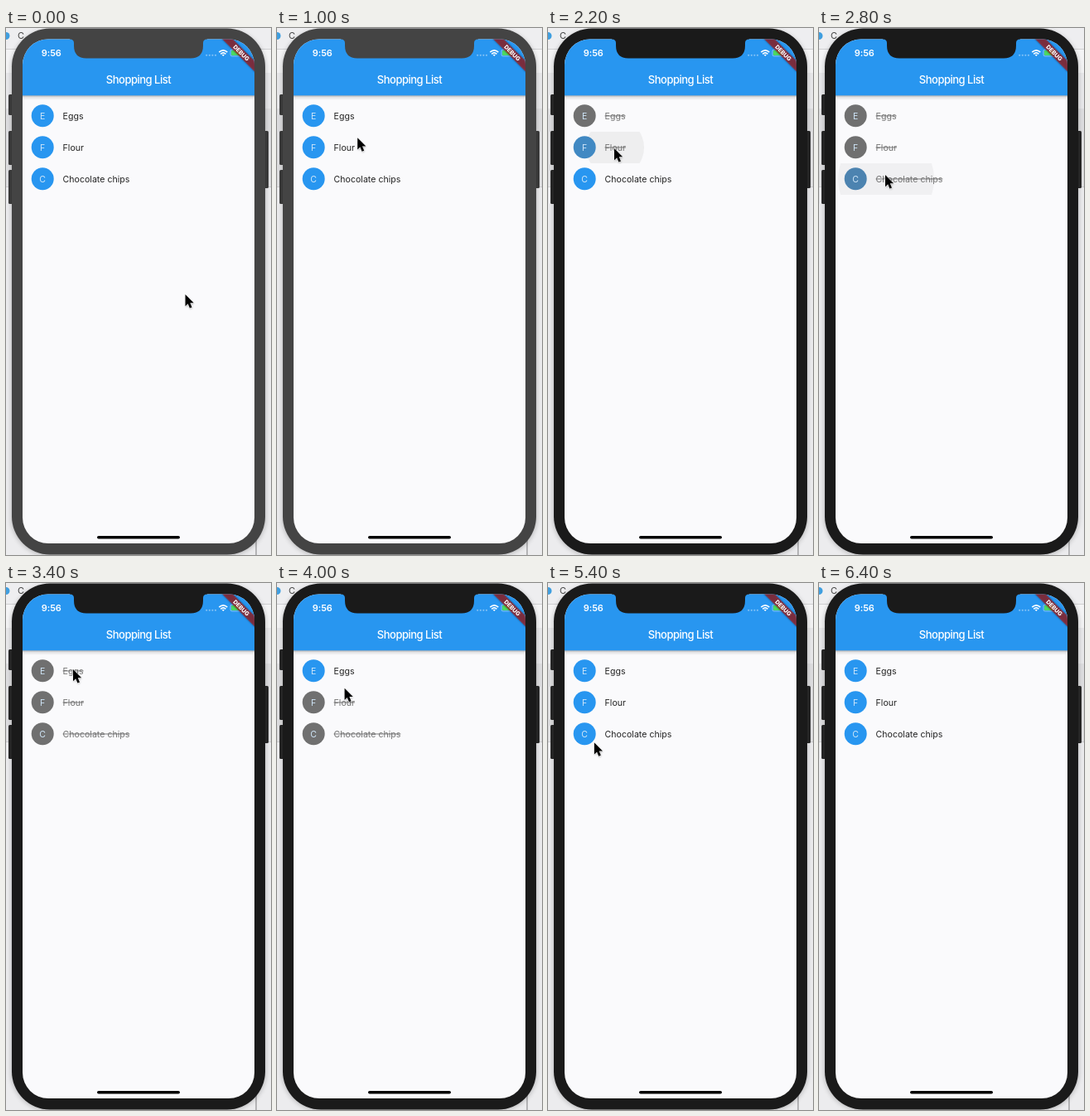
These frames come from a looping animation (320x635 px, 6.6 s). An HTML page:

```html
<!DOCTYPE html>
<html lang="en">
<head>
<meta charset="utf-8">
<title>Shopping List</title>
<style>
  html, body { margin: 0; width: 100%; height: 100%; overflow: hidden; background: #ececee; }
  svg { display: block; width: 100%; height: 100%; }
  text { font-family: Inter, "Open Sans", sans-serif; }
  .mid { text-anchor: middle; }
</style>
</head>
<body>
<svg viewBox="0 0 320 635" xmlns="http://www.w3.org/2000/svg">
  <defs>
    <clipPath id="screen"><rect x="20" y="13.5" width="280" height="607.5" rx="31"/></clipPath>
    <linearGradient id="barShade" x1="0" y1="0" x2="0" y2="1">
      <stop offset="0" stop-color="#000" stop-opacity=".32"/>
      <stop offset=".4" stop-color="#000" stop-opacity=".1"/>
      <stop offset="1" stop-color="#000" stop-opacity="0"/>
    </linearGradient>
    <filter id="soft" x="-20%" y="-20%" width="140%" height="140%"><feGaussianBlur stdDeviation="3"/></filter>
    <filter id="blur1" x="-40%" y="-40%" width="180%" height="180%"><feGaussianBlur stdDeviation="1"/></filter>
  </defs>

  <!-- desktop behind the phone -->
  <rect width="320" height="635" fill="#ececee"/>
  <rect width="320" height="25" fill="#eeeef0"/>
  <rect y="25" width="320" height="1" fill="#cfcfd1"/>
  <rect y="26" width="320" height="28" fill="#f4f4f5"/>
  <rect y="54" width="320" height="43" fill="#e9e9eb"/>
  <rect y="97" width="320" height="94" fill="#dedee0"/>
  <rect y="191" width="320" height="1" fill="#cacacc"/>
  <rect x="301" y="590" width="2" height="45" fill="#b4b4b6"/>
  <circle cx="0" cy="9.5" r="4.5" fill="#3f9fe0"/>
  <text x="14" y="13" font-size="11" fill="#444">C</text>
  <rect x="7" y="3" width="306" height="632" rx="46" fill="#000" opacity=".28" filter="url(#soft)"/>

  <!-- phone -->
  <g id="buttons">
    <rect x="3" y="80" width="6" height="25" rx="1.5"/>
    <rect x="3" y="124" width="6" height="41" rx="1.5"/>
    <rect x="3" y="171" width="6" height="41" rx="1.5"/>
    <rect x="311" y="124" width="6" height="69" rx="1.5"/>
  </g>
  <rect class="bezel" x="7" y="0.5" width="306" height="634" rx="46"/>

  <g clip-path="url(#screen)">
    <rect x="20" y="13" width="280" height="609" fill="#fafafc"/>
    <g id="list"></g>
    <rect x="20" y="81" width="280" height="6" fill="url(#barShade)"/>
    <rect x="20" y="13" width="280" height="68.3" fill="#2896f0"/>
    <text class="mid" x="160" y="67" font-size="13" font-weight="500" letter-spacing="-.5" fill="#fff">Shopping List</text>
    <text x="42.8" y="34.3" font-size="11" font-weight="600" letter-spacing="-.1" fill="#fff">9:56</text>
    <g fill="#fff" opacity=".4">
      <circle cx="242.2" cy="32.8" r="1.1"/><circle cx="245.8" cy="32.8" r="1.1"/>
      <circle cx="249.4" cy="32.8" r="1.1"/><circle cx="253" cy="32.8" r="1.1"/>
    </g>
    <g fill="none" stroke="#fff" stroke-width="1.6">
      <path d="M257.3 29.2q5-4.6 10 0M259.2 31.3q3.1-2.8 6.2 0"/>
      <path d="M260.7 32.3L262.3 34L263.9 32.3Q262.3 31 260.7 32.3z" fill="#fff" stroke="none"/>
    </g>
    <rect x="271" y="26" width="15.5" height="8" rx="2" fill="none" stroke="#fff" stroke-opacity=".5" stroke-width=".8"/>
    <rect x="272" y="27" width="11" height="6" rx="1" fill="#4cd964"/>
    <g transform="translate(300 14) rotate(45)">
      <rect x="-34" y="18.1" width="68" height="8.9" fill="#000" opacity=".5" filter="url(#blur1)"/>
      <rect x="-34" y="18.1" width="68" height="8.9" fill="#b71c1c" opacity=".63"/>
      <text class="mid" x="0" y="25.1" font-size="7" font-weight="800" fill="#fff">DEBUG</text>
    </g>
    <rect x="110" y="612" width="100" height="3.6" rx="1.8" fill="#050505"/>
  </g>
  <path class="bezel" d="M77 12.5V13.5Q82 13.5 82 18V21Q82 36.5 97 36.5H223Q238 36.5 238 21V18Q238 13.5 243 13.5V12.5z"/>

  <g id="cursor">
    <path d="M0 0V14.2L3.2 11.3L5.4 16.5L8 15.4L5.8 10.3H10.2z" transform="translate(.5 1.2)" fill="#000" opacity=".3" filter="url(#blur1)"/>
    <path d="M0 0V14.2L3.2 11.3L5.4 16.5L8 15.4L5.8 10.3H10.2z" fill="#000" stroke="#fff" stroke-width="1" stroke-linejoin="round" paint-order="stroke"/>
  </g>
</svg>
<script>
const LOOP = 6600, STEP = 200, FOCUS = 1400;
const BLUE = [40, 150, 240], GREY = [112, 112, 112];
const NS = "http://www.w3.org/2000/svg";

// on / off: moments when the item is ticked and unticked
const items = [
  { name: "Eggs", y: 106, on: 1530, off: 3530 },
  { name: "Flour", y: 144, on: 2130, off: 4270 },
  { name: "Chocolate chips", y: 182, on: 2700, off: 4870 }
];

// time, x, y of the pointer tip
const path = [
  [0, 216.5, 321], [300, 216.5, 321], [1200, 80, 105], [1650, 80, 105],
  [2000, 80, 145], [2250, 80, 145], [2600, 80, 177], [2900, 80, 177],
  [3400, 81, 104], [3750, 81, 104], [4200, 82, 143], [4350, 82, 143],
  [4700, 81, 179], [5100, 81, 179], [6000, -16, 230], [LOOP, -16, 230]
];

const $ = id => document.getElementById(id);
const clamp = v => Math.max(0, Math.min(1, v));
const ease = u => u * u * (3 - 2 * u);
const bezels = document.querySelectorAll(".bezel");

function add(parent, tag, attrs, text) {
  const el = document.createElementNS(NS, tag);
  for (const k in attrs) el.setAttribute(k, attrs[k]);
  if (text) el.textContent = text;
  return parent.appendChild(el);
}

function buildRow(item, i) {
  const list = $("list"), y = item.y;
  const clip = add(list, "clipPath", { id: "row" + i });
  add(clip, "rect", { x: 20, y: y - 19, width: 280, height: 38 });
  const inkBox = add(list, "g", { "clip-path": `url(#row${i})` });
  item.ink = add(inkBox, "circle", { cx: 81, cy: y, fill: "#c8c8c8" });
  item.disc = add(list, "circle", { cx: 44.2, cy: y - .3, r: 13.5 });
  add(list, "text", { class: "mid", x: 44.2, y: y + 3.5, "font-size": 10.5, fill: "#cfe6f8" }, item.name[0]);
  item.label = add(list, "text", { x: 68.6, y: y + 3.6, "font-size": 10.6 }, item.name);
  item.strike = add(list, "rect", { x: 68.6, y: y - .5, height: .9, fill: "#6c6c6c" });
}

function drawRow(item, t) {
  const done = t >= item.on && t < item.off;
  const mix = clamp((t - item.on) / 200) - clamp((t - item.off) / 200);
  const rgb = BLUE.map((b, k) => Math.round(b + (GREY[k] - b) * mix));
  item.disc.setAttribute("fill", `rgb(${rgb})`);
  item.label.setAttribute("fill", done ? "#747474" : "#232323");
  item.strike.setAttribute("width", done ? item.label.getComputedTextLength() : 0);

  const age = t - (t >= item.off ? item.off : item.on);
  const live = age >= 0 && age < 200;
  item.ink.setAttribute("r", live ? Math.max(0, 35 + .77 * (age - 70)) : 0);
  item.ink.setAttribute("opacity", live ? .4 * (1 - age / 200) : 0);
}

function drawCursor(t) {
  const i = path.findIndex((p, k) => k && t < p[0]);
  const [t0, x0, y0] = path[i - 1], [t1, x1, y1] = path[i];
  const u = ease((t - t0) / (t1 - t0));
  $("cursor").setAttribute("transform", `translate(${x0 + (x1 - x0) * u} ${y0 + (y1 - y0) * u})`);
}

function draw(ms) {
  const t = Math.floor((ms % LOOP) / STEP) * STEP;
  const focused = t >= FOCUS;
  bezels.forEach(b => b.setAttribute("fill", focused ? "#1a1a1a" : "#444"));
  $("buttons").setAttribute("fill", focused ? "#242424" : "#383838");
  items.forEach(item => drawRow(item, t));
  drawCursor(t);
}

items.forEach(buildRow);
const start = performance.now();
function tick() {
  draw(performance.now() - start);
  requestAnimationFrame(tick);
}
tick();
</script>
</body>
</html>
```
